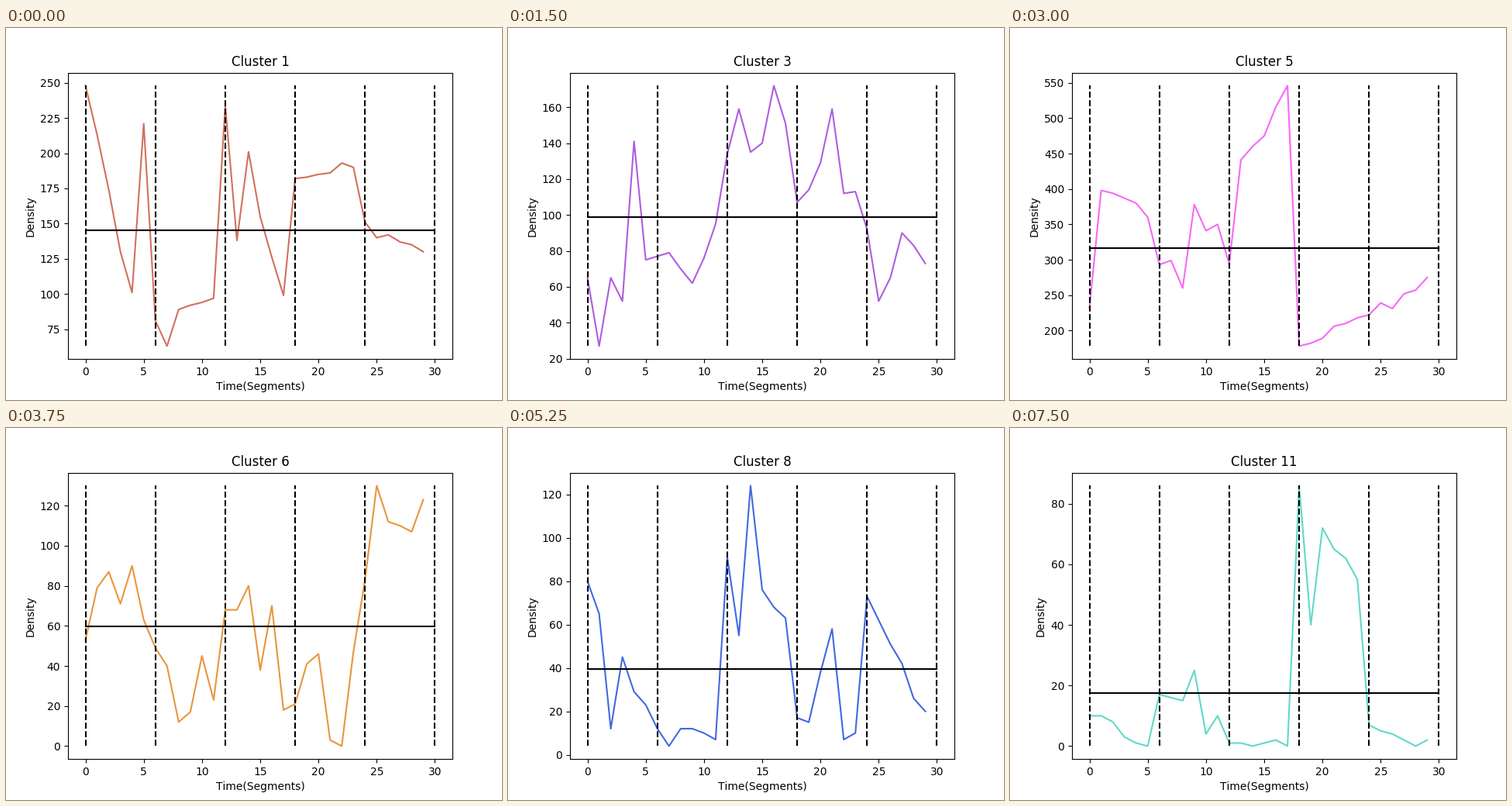
Recreate the animation shown at these times as a matplotlib script. Size 640 by 480 pixels, loop 8000 ms.

```python
import numpy as np
import matplotlib.pyplot as plt
from matplotlib.animation import FuncAnimation

STEP = 250          # ms per animation tick
HOLD = 3            # ticks each chart stays on screen
TICKS = 32
SEGMENT = 6         # samples between two dashed dividers
PARTS = 5
COUNT = SEGMENT * PARTS

plt.rcParams["text.kerning_factor"] = 6
charts = {}


def add_trend(color, mean, ends, spikes):
    """One straight trend per segment, lightly roughened, with a few spikes."""
    number = len(charts) + 1
    rng = np.random.default_rng(number)
    series = np.concatenate([np.linspace(a, b, SEGMENT) for a, b in ends])
    for x, value in spikes.items():
        series[x] = value
    low, high = series.min(), series.max()
    rough = rng.normal(0, 0.02 * (high - low), COUNT)
    rough[::SEGMENT] = rough[SEGMENT - 1::SEGMENT] = 0
    rough[list(spikes)] = 0
    charts[number] = color, mean, np.clip(series + rough, low, high).round()


def add_random(color, low, high):
    """A random level per segment plus noise, scaled to low..high."""
    number = len(charts) + 1
    rng = np.random.default_rng(number)
    raw = np.repeat(rng.uniform(0, 1, PARTS), SEGMENT) + rng.normal(0, 0.22, COUNT)
    series = np.interp(raw, [raw.min(), raw.max()], [low, high]).round()
    charts[number] = color, series.mean(), series


add_trend("#d2705e", 145.4,
          [(248, 60), (81, 97), (234, 99), (182, 190), (151, 130)],
          {5: 221, 7: 63, 13: 138, 14: 201})
add_trend("#5bf02e", 81.7,
          [(73, 86), (142, 55), (27, 47), (136, 130), (67, 58)],
          {3: 42, 11: 107, 12: 89, 13: 31, 20: 86, 27: 102})
add_random("#b05ce0", 27, 172)
add_trend("#0ce857", 31.3,
          [(89, 22), (13, 8), (30, 33), (3, 10), (51, 37)],
          {1: 32, 3: 77, 12: 92, 26: 59})
add_trend("#f768f7", 316.4,
          [(420, 360), (293, 350), (400, 546), (178, 218), (222, 275)],
          {0: 232, 8: 260, 9: 378, 12: 294})
add_random("#e8963c", 0, 130)
add_trend("#e9f835", 40.6,
          [(8, 18), (19, 20), (28, 16), (102, 112), (66, 20)],
          {0: 80, 1: 30, 3: 7, 15: 8, 19: 64, 22: 111, 23: 72, 27: 68})
add_trend("#4169e1", 39.5,
          [(80, 23), (12, 7), (91, 63), (17, 10), (73, 20)],
          {2: 12, 7: 4, 13: 55, 14: 124, 20: 38, 21: 58})
add_random("#d84a8c", 35, 160)
add_random("#7fb53a", 108, 262)
add_trend("#62d8ca", 17.5,
          [(10, 0), (17, 10), (1, 0), (86, 55), (7, 2)],
          {9: 25, 10: 4, 19: 40})

fig, ax = plt.subplots(figsize=(6.4, 4.8), dpi=100)


def draw(tick):
    number = tick // HOLD + 1
    color, mean, density = charts[number]
    ax.clear()
    ax.plot(density, color=color)
    ax.plot([0, COUNT], [mean, mean], "k-")
    for x in range(0, COUNT + 1, SEGMENT):
        ax.plot([x, x], [density.min(), density.max()], "k--")
    ax.set_title(f"Cluster {number}")
    ax.set_xlabel("Time(Segments)")
    ax.set_ylabel("Density")
    return ax.lines


anim = FuncAnimation(fig, draw, frames=TICKS, interval=STEP,
                     init_func=lambda: draw(0), repeat=True, repeat_delay=0)
plt.show()
```
